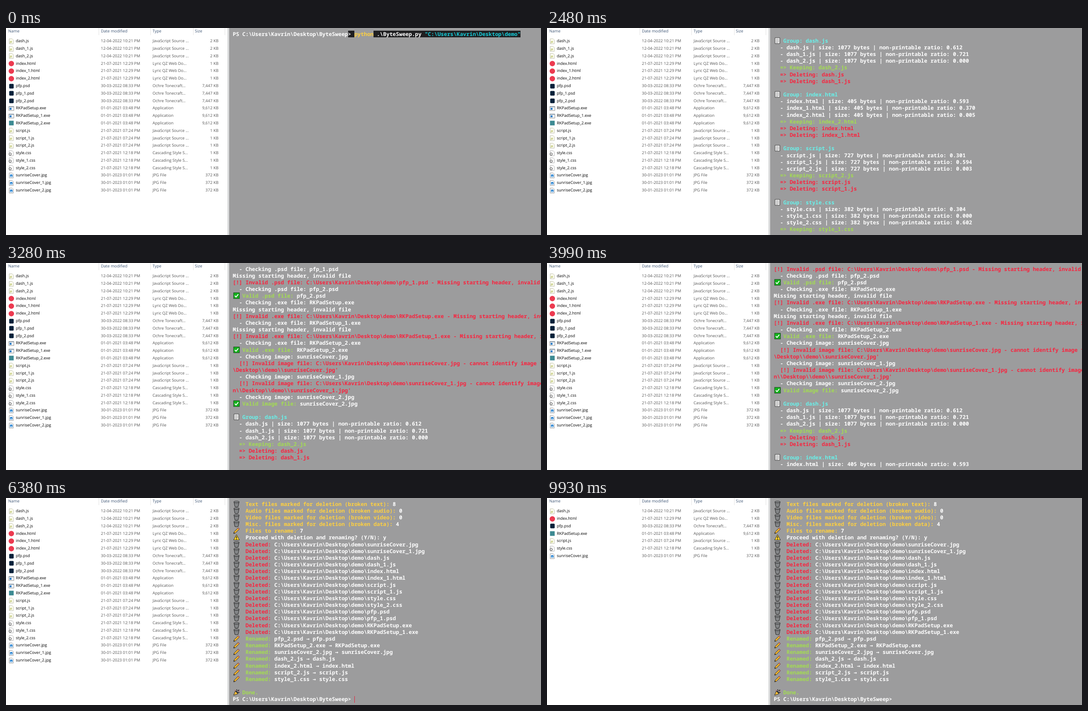
These frames come from a looping animation (1201 px wide and 466 px high, 9.97 s). An HTML page:

```html
<!DOCTYPE html>
<html lang="en">
<head>
<meta charset="utf-8">
<title>Duplicate file cleanup</title>
<style>
html, body { margin: 0; width: 100%; height: 100%; overflow: hidden; background: #fff; }
#stage { position: relative; width: 1201px; height: 466px; overflow: hidden; background: #fff; text-rendering: geometricPrecision; }
#stage div, #stage svg { position: absolute; }
#stage div { white-space: pre; }
#files { inset: 0 auto auto 0; width: 497px; height: 466px; overflow: hidden; font: 9px/16.785px "Open Sans", "Noto Sans", sans-serif; color: #555; }
.head { color: #3f5675; top: -1.4px; }
.rule { top: 0; width: 1px; height: 16px; background: #e3e3e3; }
.row { left: 0; width: 497px; height: 16.785px; }
.row .name { left: 22px; color: #000; }
.row .size { right: 20px; }
.row svg { left: 5px; top: 1.5px; width: 14px; height: 14px; }
#gap { left: 497px; top: 0; width: 4px; height: 466px; background: #dadbdc; }
#term { left: 501px; top: 0; width: 700px; height: 466px; overflow: hidden; background: #9c9c9d; color: #fff;
  font: 600 11.98px/15.17px "Noto Sans Mono", "DejaVu Sans Mono", monospace; }
.line { left: 8px; height: 15.17px; }
.line svg { left: 1px; top: 0; width: 15px; height: 15px; }
.r { color: #f8243f; } .g { color: #a3dc52; } .c { color: #68f1ea; } .y { color: #ffd03f; }
.d, .s { display: inline-block; height: 15px; background: #1f1f21; }
.s { color: #14cbd8; }
.arrow { font-family: "DejaVu Sans Mono", monospace; }
#cursor { width: 1px; height: 15px; background: #e61f3b; }
</style>
</head>
<body>
<div id="stage">
  <div id="files"></div>
  <div id="gap"></div>
  <div id="term"><div id="cursor"></div></div>
</div>
<script>
const LOOP = 9970, ROWS = 30, PITCH = 15.17, CHAR = 7.188, ROW_H = 16.785;
const $ = id => document.getElementById(id);

function add(parent, cls, text = '', style = {}) {
  const el = document.createElement('div');
  el.className = cls;
  el.textContent = text;
  Object.assign(el.style, style);
  parent.append(el);
  return el;
}

const svg = body => `<svg viewBox="0 0 16 16">${body}</svg>`;
const page = (inner, edge = '#8b8b8b', fill = '#fff') =>
  svg(`<path d="M2.500 1.500h7.500L13 4.500v10H2.500z" fill="${fill}" stroke="${edge}"/>${inner}`);

const icons = {
  js: page('<text x="4.2" y="11" font-size="6" font-weight="700" font-family="Open Sans, sans-serif" fill="#9aa52c">JS</text>', '#b9b9a4', '#fdfdf2'),
  html: svg('<circle cx="8" cy="8" r="7" fill="#ec3a50"/>'),
  psd: svg('<rect x="2.5" y="2" width="11.5" height="12" rx="2" fill="#06213a"/>'),
  exe: svg('<path d="M1.5 3h13v10.5h-13z" fill="#fff" stroke="#777"/><path d="M1.5 3h13v2h-13z" fill="#8fa1b2"/><path d="M3.5 6.5h5v5h-5z" fill="#2779c4"/>'),
  setup: svg('<rect x="2" y="2" width="12" height="12" fill="#3d8a92"/>'),
  css: page('<circle cx="5" cy="10" r="3" fill="#ddd" stroke="#777" stroke-width="2" stroke-dasharray="1.6 .75"/><circle cx="5" cy="10" r="2.4" fill="#fff" stroke="#777"/>', '#a5a5a5'),
  jpg: page('<rect x="4.500" y="5.5" width="6.5" height="6.5" rx="1" fill="#2580cf"/><path d="M5.500 11l2-3 2.4 3z" fill="#d7efff"/>'),
  doc: svg('<path d="M2 1h11.5v14H2z" fill="#f4f4f4" stroke="#333"/><path d="M4 4h7M4 6.3h7.5M4 8.6h7.5M4 10.9h7.5M4 13h5" stroke="#999"/>'),
  bin: svg('<path d="M2 3.500L4 14q4 2 8 0l2-10.500z" fill="#6d6f71" stroke="#222"/><path d="M5 6l1 8M8 6v8.500M11 6l-1 8M3.500 8h9M4 11.500h8" stroke="#a8aaac" stroke-width=".6"/><ellipse cx="8" cy="3" rx="6.500" ry="2" fill="#8d8f91" stroke="#222"/>'),
  pen: svg('<path d="M1 15l1.5-4.5L12 1.2 15 4 5.5 13.5z" fill="#f5b52d" stroke="#222"/><path d="M11 2.2l3 3L15 4 12 1.2z" fill="#e0566a"/><path d="M1 15l1-3 2 2z" fill="#222"/>'),
  warn: svg('<path d="M8 1.5L15 14.5H1z" fill="#ffd52e" stroke="#222" stroke-linejoin="round"/><path d="M8 5.5v4.8M8 11.5v1.7" stroke="#111" stroke-width="1.7"/>'),
  ok: svg('<rect x="1" y="1" width="14" height="14" fill="#13b31c" stroke="#173a18"/><path d="M3.8 8.2l3 3 5.5-6.5" fill="none" stroke="#fff" stroke-width="2"/>'),
  party: svg('<path d="M1 15L5 5l6.5 6.5z" fill="#f5bd38" stroke="#222"/><path d="M5 5l6.5 6.5 1-2.5-5-5z" fill="#2a2a2e"/><path d="M8 1l1.5 3M11 5l3-3M12 8l3 .5" stroke="#222" stroke-width="1.7"/><path d="M4 3h1.5M13 5h1.5" stroke="#d8435b" stroke-width="1.5"/>')
};

// File list
const kinds = {
  js: 'JavaScript Source ...', html: 'Lyric QZ Web Do...', psd: 'Ochre Tonecraft...',
  exe: 'Application', css: 'Cascading Style S...', jpg: 'JPG File'
};
const files = [
  ['dash', 'js', '12-04-2022 10:21 PM', '2 KB'],
  ['index', 'html', '21-07-2021 12:29 PM', '1 KB'],
  ['pfp', 'psd', '30-03-2022 08:33 PM', '7,447 KB'],
  ['RKPadSetup', 'exe', '01-01-2021 03:48 PM', '9,612 KB'],
  ['script', 'js', '21-07-2021 07:24 PM', '1 KB'],
  ['style', 'css', '21-07-2021 12:18 PM', '1 KB'],
  ['sunriseCover', 'jpg', '30-01-2023 01:01 PM', '372 KB']
];

function fileList(copies) {
  const list = add($('files'), 'list');
  list.style.width = '497px';
  files.forEach(([base, ext, date, size], n) => {
    for (let i = 0; i < copies; i++) {
      const row = add(list, 'row', '', { top: 21.3 + (n * copies + i) * ROW_H + 'px' });
      const intact = ext === 'exe' && (copies === 1 || i === 2);
      row.innerHTML = icons[intact ? 'setup' : ext];
      add(row, 'name', `${base}${i ? '_' + i : ''}.${ext}`);
      add(row, 'date', date, { left: '213px' });
      add(row, 'kind', kinds[ext], { left: '329px' });
      add(row, 'size', size);
    }
  });
  return list;
}

[['Name', 5], ['Date modified', 213], ['Type', 329], ['Size', 424]]
  .forEach(([label, x]) => add($('files'), 'head', label, { left: x + 'px' }));
[208, 324, 420, 491].forEach(x => add($('files'), 'rule', '', { left: x + 'px' }));
const before = fileList(3), after = fileList(1);

// Terminal lines: icon name, then pairs of colour class and text
const home = 'C:\\Users\\Kavrin\\Desktop\\';
const path = f => home + 'demo\\' + f;
const lines = [];
const put = (icon, ...parts) => lines.push([icon, parts]);

put('', 'w', `PS ${home}ByteSweep`, 'd', '> ', 'y', 'python', 'd', ' .\\ByteSweep.py ', 's', `"${home}demo"`);

for (const [base, ext] of [['pfp', '.psd'], ['RKPadSetup', '.exe']]) {
  ['', '_1', '_2'].forEach((n, i) => {
    const f = base + n + ext;
    put('', 'w', `  - Checking ${ext} file: ${f}`);
    if (i === 2) return put('ok', 'g', `   Valid ${ext} file: `, 'w', f);
    put('', 'w', 'Missing starting header, invalid file');
    put('', 'r', `[!] Invalid ${ext} file: ${path(f)} - Missing starting header, invalid file`);
  });
}
['', '_1', '_2'].forEach((n, i) => {
  const f = `sunriseCover${n}.jpg`;
  put('', 'w', `  - Checking image: ${f}`);
  if (i === 2) return put('ok', 'g', '   Valid image file: ', 'w', f);
  put('', 'r', `  [!] Invalid image file: ${path(f)} - cannot identify image file`);
  put('', 'r', `${['\\', 'n\\\\'][i]}Desktop\\\\demo\\\\${f}'`);
});
put('');

const groups = [
  ['dash', 'js', 1077, ['0.612', '0.721', '0.000'], 2],
  ['index', 'html', 405, ['0.593', '0.370', '0.005'], 2],
  ['script', 'js', 727, ['0.301', '0.594', '0.003'], 2],
  ['style', 'css', 382, ['0.304', '0.000', '0.602'], 1]
];
for (const [base, ext, size, ratios, keep] of groups) {
  const names = ['', '_1', '_2'].map(n => `${base}${n}.${ext}`);
  put('doc', 'c', `   Group: ${names[0]}`);
  names.forEach((f, i) => put('', 'w', `  - ${f} | size: ${size} bytes | non-printable ratio: ${ratios[i]}`));
  put('', 'g', `  => Keeping: ${names[keep]}`);
  names.forEach((f, i) => i !== keep && put('', 'r', `  => Deleting: ${f}`));
  put('');
}

put('', 'w', '='.repeat(60));
[['Image', 'images', 2], ['Text', 'text', 8], ['Audio', 'audio', 0], ['Video', 'video', 0], ['Misc.', 'data', 4]]
  .forEach(([kind, what, n]) => put('bin', 'y', `    ${kind} files marked for deletion (broken ${what}): `, 'w', n));
put('pen', 'y', '    Files to rename: ', 'w', 7);
put('warn', 'w', '    Proceed with deletion and renaming? (Y/N): ', 'w answer', 'y');
const ASKED = lines.length;

['sunriseCover.jpg', 'sunriseCover_1.jpg', 'dash.js', 'dash_1.js', 'index.html', 'index_1.html', 'script.js',
  'script_1.js', 'style.css', 'style_2.css', 'pfp.psd', 'pfp_1.psd', 'RKPadSetup.exe', 'RKPadSetup_1.exe']
  .forEach(f => put('bin', 'r', '    Deleted: ', 'w', path(f)));
['pfp_2.psd', 'RKPadSetup_2.exe', 'sunriseCover_2.jpg', 'dash_2.js', 'index_2.html', 'script_2.js', 'style_1.css']
  .forEach(f => put('pen', 'g', '    Renamed: ', 'w', f + ' ', 'arrow', '→', 'w', ' ' + f.replace(/_\d/, '')));
put('');
put('party', 'g', '   Done.');
put('', 'w', `PS ${home}ByteSweep> `);
const DONE = lines.length;

const lineEls = lines.map(([icon, parts]) => {
  const el = add($('term'), 'line');
  if (icon) el.innerHTML = icons[icon];
  for (let i = 0; i < parts.length; i += 2) {
    const span = document.createElement('span');
    span.className = parts[i];
    span.textContent = parts[i + 1];
    el.append(span);
  }
  return el;
});
const answer = document.querySelector('.answer');
$('term').append($('cursor'));

// Timelines: [start in ms, value]
const printed = [[0, 1], [960, 9], [1030, 25], [1090, 46], [1160, ASKED], [6380, DONE]];
const scrolled = [[0, 0]];
for (let k = 1; k < 16; k++) scrolled.push([1970 + Math.floor((k - 1) * 52.67), Math.round(k * 16 / 15)]);
scrolled.push([2760, 18], [3140, 22], [3210, 27], [3280, 32], [3390, 36],
  [3990, 30], [4090, 24], [4190, 18], [4290, 12], [4570, 6], [4650, 0]);
const blink = [0, 530, 1410, 1970, 5160, 5690, 6940, 7540, 8040, 8630, 9130, 9700, 9930].map((t, i) => [t, i % 2]);
const at = (table, t) => table.findLast(step => step[0] <= t)[1];

function cursorCell(t, count) {
  if (t < 890) return [90, 0];
  if (count === ASKED) return [t < 5950 ? 47 : 48, ASKED - 1];
  if (count === DONE) return [38, DONE - 1];
  return [0, count];
}

let shown = '';
function draw(t) {
  const count = at(printed, t), on = at(blink, t);
  const [col, line] = cursorCell(t, count);
  const top = Math.max(0, line + 1 - ROWS) - at(scrolled, t);
  const key = [count, on, col, line, top, t >= 8070].join();
  if (key === shown) return;
  shown = key;

  lineEls.forEach((el, i) => {
    const row = i - top;
    el.style.display = i < count && row >= 0 && row < ROWS ? '' : 'none';
    el.style.top = 5.5 + row * PITCH + 'px';
  });
  answer.style.visibility = t >= 5950 ? '' : 'hidden';
  const row = line - top;
  Object.assign($('cursor').style, {
    display: on && row < ROWS ? '' : 'none',
    left: Math.round(8 + col * CHAR) + 'px',
    top: Math.round(5.8 + row * PITCH) + 'px'
  });
  before.style.display = t < 8070 ? '' : 'none';
  after.style.display = t < 8070 ? 'none' : '';
}

const start = performance.now();
function tick() {
  draw((performance.now() - start) % LOOP);
  requestAnimationFrame(tick);
}
tick();
</script>
</body>
</html>
```
